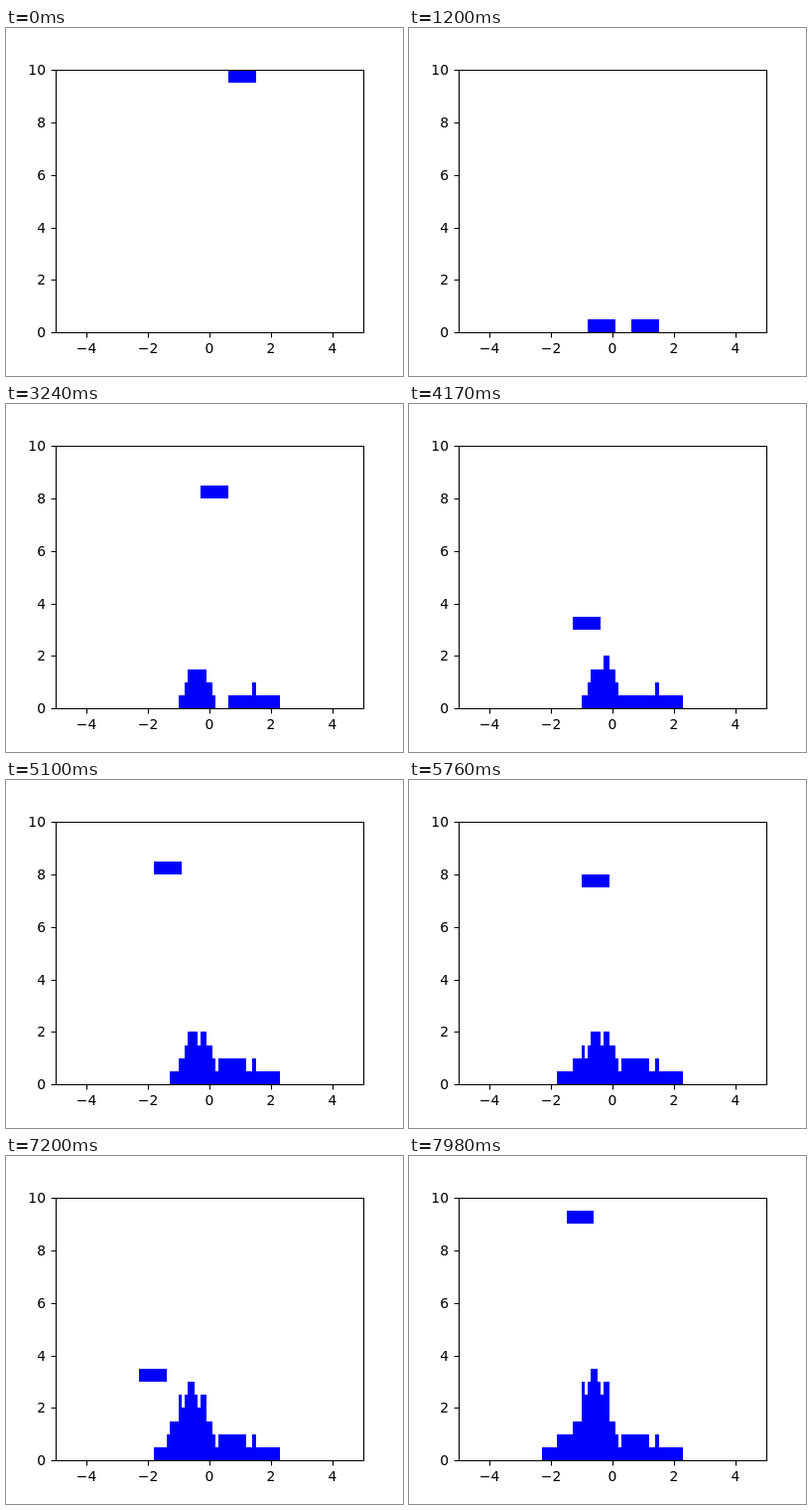
Write an HTML page that moves like this. It is 400 px wide and 350 px high and loops after 8000 ms.

```html
<!DOCTYPE html>
<html lang="en">
<head>
<meta charset="utf-8">
<title>Falling blocks</title>
<style>
html, body { margin: 0; width: 100%; height: 100%; overflow: hidden; background: #fff; }
svg { display: block; width: 400px; height: 350px; }
text { font: 13.89px "DejaVu Sans", sans-serif; }
#frame { fill: none; stroke: #000; stroke-width: 1.11; }
#blocks { fill: #00f; shape-rendering: crispEdges; }
</style>
</head>
<body>
<svg viewBox="0 0 400 350">
  <path id="blocks"/>
  <path id="frame"/>
  <g id="labels"></g>
</svg>
<script>
const LOOP = 8000, STEP = 30, WIDTH = 9, TOP_LEVEL = 19;
// Left edge of each dropped block, in tenths of an x unit.
const drops = [6, -8, 14, -7, -10, -3, -13, 3, -18, -10, -14, -23, -10, -15];

const px = tenths => Math.round(205 + 31 * tenths / 10);
const py = level => Math.round(306.25 - 13.2125 * level);
const byId = id => document.getElementById(id);

function drawAxes() {
  let path = 'M50.5 42.5H360.5V306.5H50.5Z';
  const label = (x, y, anchor, value) => {
    const text = document.createElementNS('http://www.w3.org/2000/svg', 'text');
    text.setAttribute('x', x);
    text.setAttribute('y', y);
    text.setAttribute('text-anchor', anchor);
    text.textContent = String(value).replace('-', '\u2212');
    byId('labels').append(text);
  };
  for (let v = -4; v <= 4; v += 2) {
    const x = px(v * 10);
    path += `M${x + 0.5} 306.5V311.4`;
    label(x, 327, 'middle', v);
  }
  for (let v = 0; v <= 10; v += 2) {
    const y = py(v * 2);
    path += `M50.5 ${y + 0.5}H45.6`;
    label(40, y + 5, 'end', v);
  }
  byId('frame').setAttribute('d', path);
}

const columnsOf = left => Array.from({ length: WIDTH }, (_, i) => left + i);

// Each block knows its first step, its lowest resting level and the pile below it.
const heights = {};
let nextStart = 0;
const blocks = drops.map(left => {
  const columns = columnsOf(left);
  const pile = { ...heights };
  const floor = Math.min(...columns.map(c => pile[c] || 0));
  const start = nextStart;
  columns.forEach(c => { heights[c] = (heights[c] || 0) + 1; });
  nextStart += TOP_LEVEL + 2 - floor;
  return { columns, pile, start };
});

const box = (column, low, high) =>
  `M${px(column)} ${py(low)}V${py(high)}H${px(column + 1)}V${py(low)}Z`;

function draw(step) {
  const { columns, pile, start } = blocks.findLast(b => b.start <= step);
  const level = TOP_LEVEL - (step - start);
  let path = '';
  for (const c in pile) path += box(+c, 0, pile[c]);
  for (const c of columns) {
    const low = Math.max(level, pile[c] || 0);
    path += box(c, low, low + 1);
  }
  byId('blocks').setAttribute('d', path);
}

function tick() {
  draw(Math.floor(performance.now() % LOOP / STEP));
  requestAnimationFrame(tick);
}

drawAxes();
tick();
</script>
</body>
</html>
```
